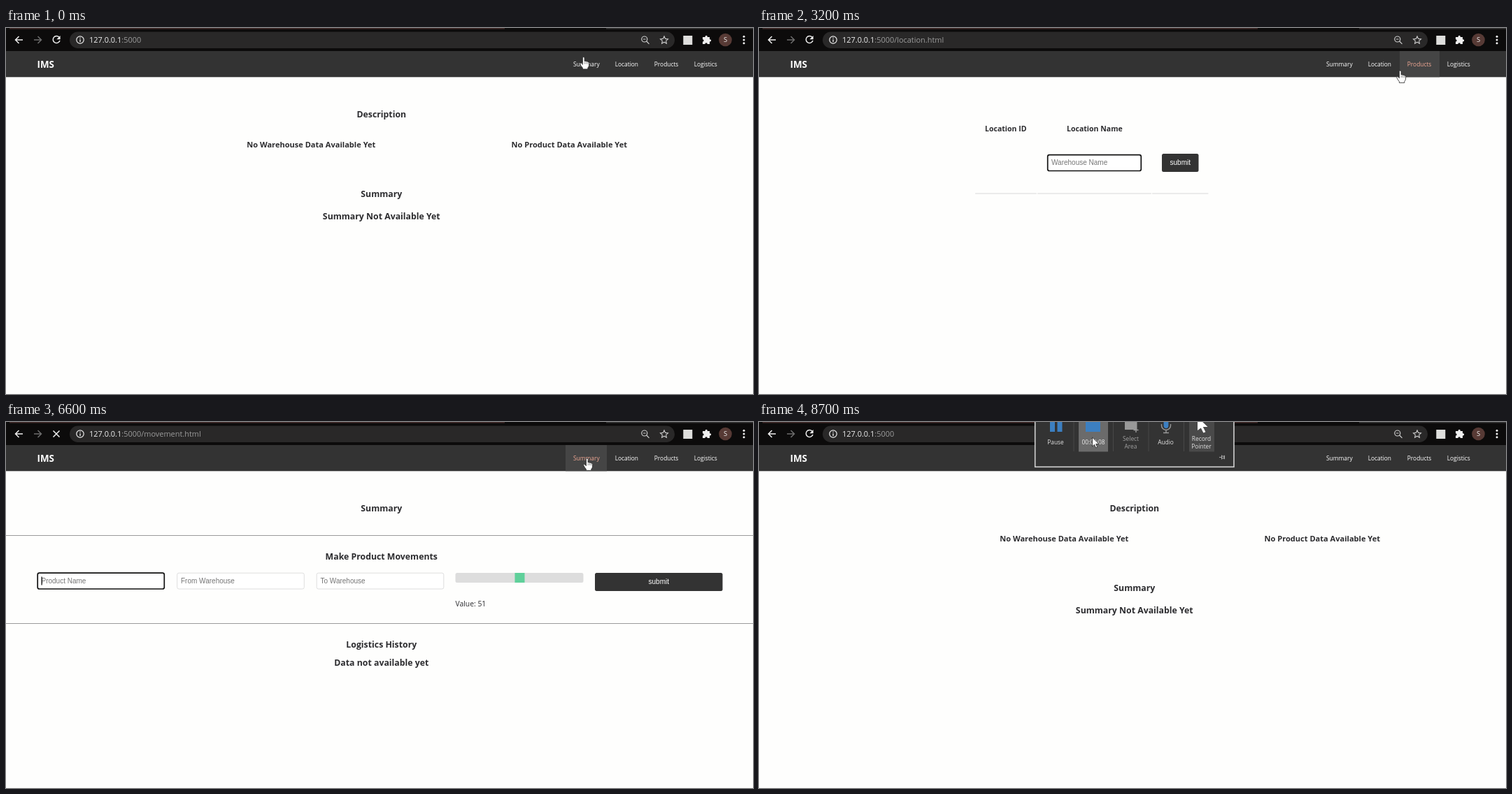
Recreate the animation shown at these times as an HTML page. Size 1068x524 px, loop 8800 ms.

```html
<!DOCTYPE html>
<html lang="en">
<head>
<meta charset="utf-8">
<title>Inventory walkthrough</title>
<style>
  html, body { margin: 0; width: 100%; height: 100%; overflow: hidden; background: #fefefd; }
  svg { display: block; width: 1068px; height: 524px; }
  text { font-family: "Open Sans", "Noto Sans", sans-serif; fill: #2c2c2f; }
  .bold { font-weight: 700; }
  .form { font-family: "Liberation Sans", Arial, sans-serif; }
  .mid { text-anchor: middle; }
  .icon { fill: none; stroke: #f0f0f0; stroke-width: 1.5; }
</style>
</head>
<body>
<svg id="stage" viewBox="0 0 1068 524"></svg>
<script>
const LOOP = 8800, STEP = 100;
const INK = "#333333";
const stage = document.getElementById("stage");

const rect = (x, y, w, h, fill, extra = "") =>
  `<rect x="${x}" y="${y}" width="${w}" height="${h}" fill="${fill}" ${extra}/>`;
const label = (x, y, size, str, cls = "", fill = "") =>
  `<text x="${x}" y="${y}" font-size="${size}" class="${cls}" ${fill && `style="fill:${fill}"`}>${str}</text>`;
const heading = (x, y, str, size = 12.3) => label(x, y, size, str, "bold mid");
const column = (x, str) => label(x, 148, 10.55, str, "bold");
const group = (id, body, extra = "") => `<g id="${id}" ${extra}>${body}</g>`;
const icon = (d, extra = "") => `<path class="icon" d="${d}" ${extra}/>`;

function input(x, y, w, hint, focused) {
  const edge = focused ? 'stroke="#111" stroke-width="1.7"' : 'stroke="#dedede"';
  return rect(x + .7, y + .7, w - 1.4, 22.8, "#fff", `rx="2.5" ${edge}`) +
    label(x + 6, y + 15.2, 10, hint, "form", "#757575") +
    (focused ? rect(x + 6, y + 6, 1.2, 12, "#000", 'class="caret"') : "");
}

const button = (x, y, w) => rect(x, y, w, 26, INK, 'rx="2.5"') +
  label(x + w / 2, y + 16, 10, "submit", "form mid", "#fff");

const rule = (...stops) => stops.slice(1).map((end, i) =>
  rect(stops[i] + .6, 236.5, end - stops[i] - 1.2, 1, "#d9d9d9")).join("");

const divider = y => rect(0, y, 1068, 1, "#9a9a9a");

const pages = {
  summary: heading(536.8, 128, "Description") +
    heading(436.3, 170.5, "No Warehouse Data Available Yet", 11.05) +
    heading(805.3, 170.5, "No Product Data Available Yet", 11.05) +
    heading(536.8, 242, "Summary") +
    heading(536.8, 273.5, "Summary Not Available Yet"),
  location: column(323, "Location ID") + column(440, "Location Name") +
    input(412, 181, 135, "Warehouse Name", true) + button(576, 180, 52.5) +
    rule(308.5, 397.5, 561.5, 643),
  product: column(323, "Product ID") + column(438, "Product Name") + column(616.5, "Quantity") +
    input(408, 181, 135, "Product Name", true) + input(572, 181, 135, "Quantity") +
    button(736, 180, 52.5) + rule(308.5, 393.5, 557.5, 721.5, 803),
  movement: heading(536.8, 128, "Summary") + divider(162) +
    heading(536.8, 196.5, "Make Product Movements") +
    input(44.5, 215.5, 182.5, "Product Name", true) +
    input(244, 215.5, 183, "From Warehouse") + input(443.5, 215.5, 183, "To Warehouse") +
    rect(642.5, 216, 183, 14, "#dddddd", 'rx="2.5"') + rect(727.5, 216, 14, 14, "#5fd09a") +
    label(642.5, 264, 10.35, "Value: 51") + button(842, 216, 182.5) + divider(288) +
    heading(536.8, 322.5, "Logistics History") + heading(536.8, 348.5, "Data not available yet")
};

const navItems = [
  { name: "Summary", x: 811, left: 800, right: 859 },
  { name: "Location", x: 870.7, left: 860, right: 915 },
  { name: "Products", x: 926.8, left: 916, right: 973 },
  { name: "Logistics", x: 983.7, left: 973, right: 1029 }
];

const browserBar = rect(0, 0, 1068, 33, "#0c0b0b") +
  rect(5, 0, 708, 1.5, "#402a29") + rect(858, 0, 210, 1.5, "#343434") +
  rect(91, 5.5, 865, 23.5, "#292828", 'rx="11.7"') +
  icon("M24 17H13.5M18.5 12L13.5 17L18.5 22") +
  icon("M40 17H50.5M45.5 12L50.5 17L45.5 22", 'style="stroke:#6d6d6d"') +
  group("reload", icon("M76 13.2A5 5 0 1 0 77 18") +
    '<path fill="#f0f0f0" d="M77.6 11V16.2H72.4Z"/>') +
  group("stop", icon("M67.5 12.5L76.5 21.5M76.5 12.5L67.5 21.5", 'stroke-width="1.8"')) +
  '<circle class="icon" cx="106" cy="17" r="5.2" style="stroke-width:1.2"/>' +
  icon("M106 16.2V20M106 13.8V15.1", 'style="stroke-width:1.3"') +
  `<text y="21.3" font-size="10.95"><tspan x="119" fill="#efefef">127.0.0.1</tspan><tspan id="path" fill="#9b9b9b"></tspan></text>` +
  '<circle class="icon" cx="912.8" cy="16" r="4" style="stroke:#ccc;stroke-width:1.2"/>' +
  icon("M915.8 19L919.5 22.8M911 16H914.6", 'style="stroke:#ccc;stroke-width:1.2"') +
  icon("M941 11.8L942.6 15.4L946.5 15.8L943.6 18.4L944.4 22.2L941 20.2L937.6 22.2L938.4 18.4L935.5 15.8L939.4 15.4Z",
    'style="stroke:#ccc;stroke-width:1.1"') +
  rect(968.3, 11, 13, 13, "#dededc", 'id="extension"') +
  '<path fill="#f0f0f0" d="M996 13H999.6V12.4A1.6 1.6 0 0 1 1002.8 12.4V13H1006V16.2H1006.6A1.6 1.6 0 0 1 1006.6 19.4H1006V23H1002.8A1.6 1.6 0 0 0 999.4 23H996V19.6A1.6 1.6 0 0 0 996 16.3Z"/>' +
  '<circle cx="1028.5" cy="17" r="9.3" fill="#573a35"/>' +
  label(1028.5, 20.4, 9.5, "S", "mid", "#eee") +
  [12.3, 17, 21.7].map(y => `<circle cx="1055" cy="${y}" r="1.5" fill="#f0f0f0"/>`).join("");

const nav = rect(0, 33, 1068, 37.3, INK) +
  label(44.5, 57, 13.4, "IMS", "bold", "#fff") +
  navItems.map((n, i) => rect(n.left, 33, n.right - n.left, 37.3, "#454545", `id="hover${i}"`) +
    `<text id="link${i}" x="${n.x}" y="55.2" font-size="8.4">${n.name}</text>`).join("");

const caption = (x, y, str, fill = "#e2e2e2") => label(x, y, 8.4, str, "mid", fill);
const BLUE = "#3c7fc1";
const recorder = rect(394.7, -20, 284.3, 84.3, "#333333", 'stroke="#d0d0d0" stroke-width="1.6"') +
  [449.5, 506, 556.5, 607].map(x => rect(x, -10, 1, 52, "#484848")).join("") +
  rect(457, -10, 42, 52.5, "#6b6b6b") + rect(615, -10, 36, 52.5, "#494949") +
  rect(416, -8, 7, 22, BLUE) + rect(426.5, -8, 7, 22, BLUE) + rect(467, -8, 21, 22, BLUE) +
  rect(523, -8, 17.5, 19, "#999") +
  '<path d="M539 8V15M535.5 11.5H542.5" stroke="#999" stroke-width="1.4"/>' +
  rect(578.6, -10, 6.8, 19, BLUE, 'rx="3.4"') +
  '<path d="M575.5 3V5A6.5 6.5 0 0 0 588.5 5V3M582 11.5V15.5M578 15.5H586" fill="none" stroke="#999" stroke-width="1.4"/>' +
  '<path fill="#fff" d="M627 -7L641.5 7H634.8L638.4 14.2L635.4 15.6L631.8 8.5L627 12Z"/>' +
  caption(424, 32.4, "Pause") + `<text id="timer" class="mid" x="478" y="32.4" font-size="8.4" style="fill:#eee"></text>` +
  caption(531.5, 26.8, "Select", "#a0a0a0") + caption(531.5, 38.3, "Area", "#a0a0a0") +
  caption(581.5, 32.4, "Audio") + caption(632.5, 26.8, "Record") + caption(632.5, 38.3, "Pointer") +
  '<path d="M658 50.5H661M661.5 47.5V53.5M662 49H665V52H662M665.5 47.8V53.2" fill="none" stroke="#aaa"/>';

// Both pointers have their hot spot at the origin.
const arrow = '<path fill="#fff" stroke="#333" stroke-width=".9" d="M0 0V13L3 10.3L5.1 15L7.2 14.1L5.2 9.5H9.6Z"/>';
const hand = '<path fill="#fff" stroke="#222" stroke-width=".8" d="M-1.6 1.4Q-1.5 0 -.2 0Q1.1 0 1.1 1.4V6Q2.5 5.1 3.4 6.5Q5 5.7 5.7 7Q7.6 6.6 7.6 8.6V12.2Q7 14.5 5.8 15.5V17.4H-1.6V15.6Q-3.6 13.5 -5.4 9.7Q-5 7.9 -3.2 9L-1.6 10.8Z"/>' +
  '<path d="M1.2 7V10M3.4 7.2V10M5.6 7.8V10.2" stroke="#444" stroke-width=".6"/>';

stage.innerHTML = rect(0, 0, 1068, 524, "#fefefd") +
  Object.entries(pages).map(([id, body]) => group(id, body)).join("") +
  browserBar + nav + group("recorder", recorder) +
  group("pointer", group("arrow", arrow) + group("hand", hand));

const el = id => document.getElementById(id);
const show = (id, on) => el(id).setAttribute("visibility", on ? "visible" : "hidden");
const within = (spans, t) => spans.some(([from, to]) => t >= from && t < to);

const visits = [
  { at: 0, page: "summary", path: ":5000" },
  { at: 2300, page: "location", path: ":5000/location.html" },
  { at: 4100, page: "product", path: ":5000/product.html" },
  { at: 5500, page: "movement", path: ":5000/movement.html" },
  { at: 6700, page: "summary", path: ":5000" }
];
const loading = [[300, 600], [2100, 2500], [4000, 4400], [5400, 5800], [6600, 6900]];
// A fresh page shows no hover state until the pointer moves again.
const unhovered = [[0, 200], [300, 600], [2300, 2600], [4100, 4600], [5500, 6000], [6700, 6900]];
const route = [
  [0, 826, 41.5], [400, 826, 46], [700, 835, 62], [1200, 872, 75], [1700, 886, 56],
  [2500, 887, 54], [3200, 917, 61], [3700, 943, 50], [4500, 943, 50], [5100, 998, 60],
  [5600, 1000, 61.5], [5900, 1000, 61.5], [6400, 832, 52], [6800, 830, 52],
  [7200, 645, 161], [7800, 505, 12], [8300, 476.5, 22], [LOOP, 476.5, 22]
];

const ease = k => k * k * (3 - 2 * k);

function pointerAt(t) {
  const i = route.findIndex(p => p[0] > t);
  const [t0, x0, y0] = route[i - 1], [t1, x1, y1] = route[i];
  const k = ease((t - t0) / (t1 - t0));
  return [x0 + (x1 - x0) * k, y0 + (y1 - y0) * k];
}

function draw(t) {
  const visit = visits.filter(v => v.at <= t).pop();
  for (const id in pages) el(id).setAttribute("display", id === visit.page ? "inline" : "none");
  el("path").textContent = visit.path;

  const caretOn = (t - visit.at) % 1000 < 500;
  document.querySelectorAll(".caret").forEach(c => c.setAttribute("opacity", caretOn ? 1 : 0));

  const busy = within(loading, t);
  show("reload", !busy);
  show("stop", busy);
  el("extension").setAttribute("fill", t >= 5500 && t < 5800 ? "#777777" : "#dededc");

  const [x, y] = pointerAt(t);
  let overLink = false;
  navItems.forEach((n, i) => {
    const over = y > 33 && y < 70 && x >= n.left && x < n.right;
    const lit = over && !within(unhovered, t);
    overLink = overLink || over;
    show("hover" + i, lit);
    el("link" + i).style.fill = lit ? "#f0a894" : "#ffffff";
  });
  el("pointer").setAttribute("transform", `translate(${x} ${y})`);
  show("hand", overLink && t < 7200);
  show("arrow", !overLink || t >= 7200);

  const slide = ease(Math.min(1, Math.max(0, (t - 7800) / 300)));
  show("recorder", slide > 0);
  el("recorder").setAttribute("transform", `translate(0 ${-68 * (1 - slide)})`);
  el("timer").textContent = "00:00:0" + Math.floor(t / 1000);
}

const start = performance.now();
function tick() {
  const t = (performance.now() - start) % LOOP;
  draw(Math.floor(t / STEP) * STEP);
  requestAnimationFrame(tick);
}
tick();
</script>
</body>
</html>
```
